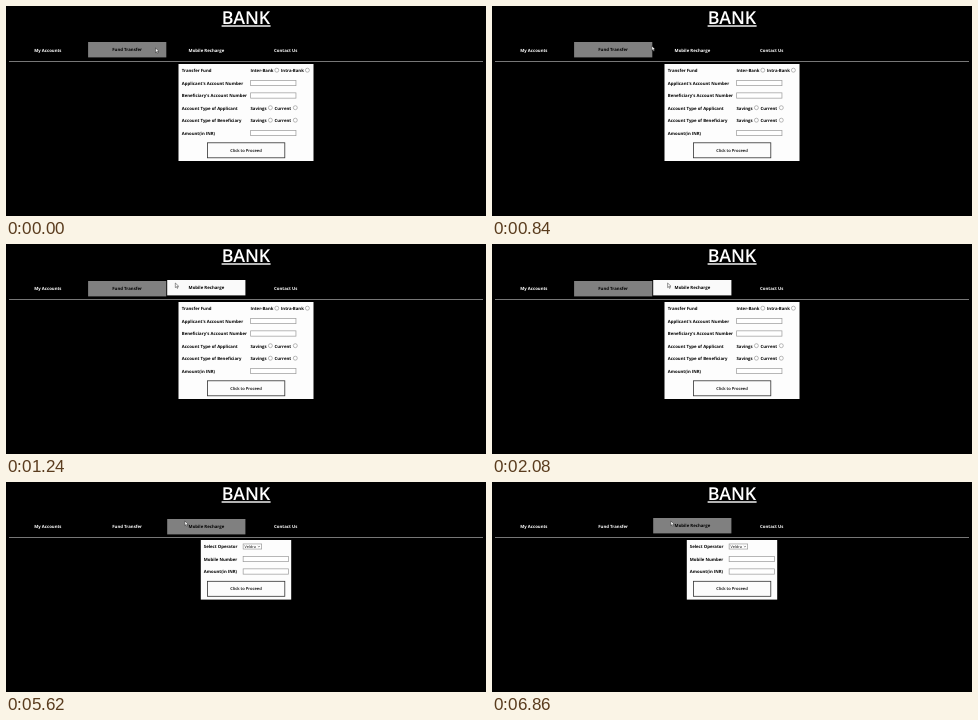
An HTML page with a canvas that plays this animation: 480 px wide and 210 px high, repeating every 8 s.

```html
<!DOCTYPE html>
<html lang="en">
<head>
<meta charset="utf-8">
<title>Bank</title>
<style>
html, body { margin: 0; width: 100%; height: 100%; overflow: hidden; background: #000; }
canvas { display: block; width: 480px; height: 210px; }
</style>
</head>
<body>
<canvas id="stage"></canvas>
<script>
const LOOP = 8000;
const BEAT = 387, BURST = 100;            // the pointer moves in short bursts
const FUND_LEAVE = 860, RECHARGE_ENTER = 1140, CLICK = 5620, RECHARGE_LIFT = 6000;
const FONT = '"Open Sans", "Noto Sans", sans-serif';
const TABS = ['My Accounts', 'Fund Transfer', 'Mobile Recharge', 'Contact Us'];
const FILL = { active: '#808080', hover: '#fafafa' };
// pointer x after a number of bursts
const TRACK = [[0, 149.5], [1, 150.2], [2, 153.6], [3, 163], [4, 171], [6, 175.6], [9, 178.8]];

const canvas = document.getElementById('stage');
const ratio = window.devicePixelRatio || 1;
canvas.width = 480 * ratio;
canvas.height = 210 * ratio;
const ctx = canvas.getContext('2d');
ctx.textRendering = 'geometricPrecision';

function rect(x, y, w, h, fill) {
  ctx.fillStyle = fill;
  ctx.fillRect(x, y, w, h);
}

function box(x, y, w, h, fill, stroke, line) {
  rect(x, y, w, h, fill);
  ctx.strokeStyle = stroke;
  ctx.lineWidth = line;
  ctx.strokeRect(x + line / 2, y + line / 2, w - line, h - line);
}

function path(points, color, width) {
  ctx.beginPath();
  points.forEach(p => ctx.lineTo(...p));
  ctx.strokeStyle = color;
  ctx.lineWidth = width;
}

function text(str, x, y, size, weight, color, align = 'left') {
  ctx.font = `${weight} ${size}px ${FONT}`;
  ctx.textAlign = align;
  ctx.fillStyle = color;
  ctx.fillText(str, x, y);
}

const rowY = i => 64.5 + 12.5 * i;
const label = (str, x, mid) => text(str, x, mid + 1.6, 4.3, 700, '#000');
const field = (x, mid) => box(x, mid - 3, 46, 6, '#fff', '#999', 0.7);

function radio(x, mid) {
  ctx.beginPath();
  ctx.arc(x, mid - 0.3, 2, 0, Math.PI * 2);
  ctx.strokeStyle = '#777';
  ctx.lineWidth = 0.5;
  ctx.stroke();
}

function choice(first, second, x, gap, mid) {
  label(first, 244.5, mid);
  radio(x, mid);
  label(second, x + 4.1, mid);
  radio(x + gap, mid);
}

function button(y) {
  box(201, y, 78.2, 15.8, '#fcfcfc', '#333', 0.8);
  text('Click to Proceed', 240, y + 9.4, 4.1, 600, '#000', 'center');
}

function tab(i, state, raised) {
  const y = raised ? 36 : 37;
  if (state) rect(3 + 79.1 * i, y, 78.2, 15.4, FILL[state]);
  text(TABS[i], 41.8 + 79.3 * i, y + 9.3, 4.3, 700, state ? '#000' : '#fff', 'center');
}

function transferForm() {
  rect(172.5, 58, 135, 97, '#fdfdfd');
  ['Transfer Fund', "Applicant's Account Number", "Beneficiary's Account Number",
    'Account Type of Applicant', 'Account Type of Beneficiary', 'Amount(in INR)'
  ].forEach((name, i) => {
    const y = rowY(i);
    label(name, 175.8, y);
    if (i === 0) choice('Inter-Bank', 'Intra-Bank', 270.8, 30.6, y);
    else if (name.includes('Type')) choice('Savings', 'Current', 264.4, 24.9, y);
    else field(244.3, y);
  });
  button(136.4);
}

function rechargeForm() {
  rect(194.8, 58, 90.4, 59.6, '#fdfdfd');
  ['Select Operator', 'Mobile Number', 'Amount(in INR)'].forEach((name, i) => {
    label(name, 197.8, rowY(i));
    if (i) field(236.8, rowY(i));
  });
  box(236.8, 61.6, 19.2, 5.8, '#fff', '#999', 0.7);
  text('Veldra', 238.6, 65.9, 3.8, 400, '#000');
  path([[251.8, 64], [252.9, 65], [254, 64]], '#333', 0.5);
  ctx.stroke();
  button(98.9);
}

function pointerX(t) {
  const n = Math.floor(t / BEAT);
  const u = Math.min(n + Math.min(1, (t - n * BEAT) / BURST), 9);
  const k = Math.max(1, TRACK.findIndex(p => p[0] >= u));
  const [u0, x0] = TRACK[k - 1], [u1, x1] = TRACK[k];
  return x0 + (x1 - x0) * (u - u0) / (u1 - u0);
}

function pointer(t) {
  const x = pointerX(t);
  ctx.save();
  ctx.translate(x, Math.max(39, 42 - (x - 149.5) / 5));
  path([[0, 0], [0, 4.6], [1.1, 3.7], [1.9, 5.4], [2.7, 5], [1.9, 3.4], [3.4, 3.3]], '#000', 0.4);
  ctx.closePath();
  ctx.fillStyle = '#fff';
  ctx.fill();
  ctx.stroke();
  ctx.restore();
}

function draw(t) {
  ctx.setTransform(ratio, 0, 0, ratio, 0, 0);
  rect(0, 0, 480, 210, '#000');
  text('BANK', 240, 17.7, 17.8, 600, '#fff', 'center');
  rect(215.6, 19.3, 49, 1.4, '#fff');
  rect(3, 55, 474, 1, '#777');

  const recharge = t >= CLICK;
  const entered = t >= RECHARGE_ENTER;
  tab(0);
  tab(1, recharge ? '' : 'active', t < FUND_LEAVE);
  if (recharge) tab(2, 'active', t >= RECHARGE_LIFT);
  else tab(2, entered ? 'hover' : '', entered);
  tab(3);

  if (recharge) rechargeForm();
  else transferForm();
  pointer(t);
}

let start;
function tick(now) {
  if (start === undefined) start = now;
  draw((now - start) % LOOP);
  requestAnimationFrame(tick);
}
draw(0);
requestAnimationFrame(tick);
</script>
</body>
</html>
```
